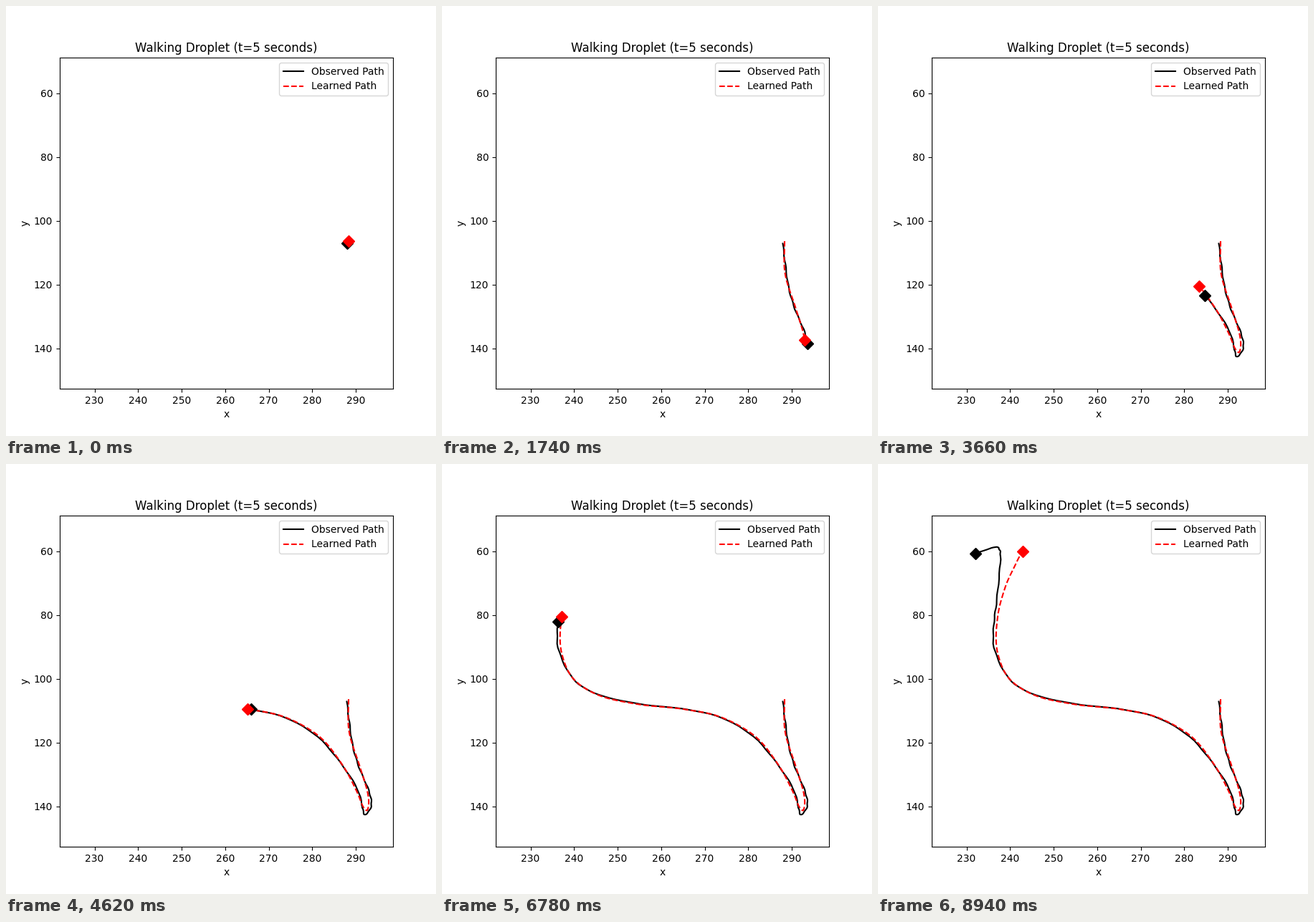
A matplotlib script that plays this animation: 600x600 px, repeating every 9000 ms.

```python
import numpy as np
import matplotlib.pyplot as plt
from matplotlib.animation import FuncAnimation

FRAMES, STEP = 150, 60

# Key poses (frame, x, y) in stage pixels, y pointing down
OBSERVED = [
    (0, 475.5, 331.5), (5, 479, 360), (11, 484, 394), (17, 492.5, 423),
    (24, 506, 455), (32, 509.5, 478), (39, 500, 489), (43, 497.5, 480),
    (48, 497, 477), (53, 490.5, 454), (59, 466, 416), (66, 428.5, 375.5),
    (71, 390, 354), (77, 341.5, 342.5), (85, 277, 335), (92, 219, 322),
    (99, 182.5, 299), (105, 163.5, 262), (113, 162, 220), (118, 165, 196),
    (128, 171, 129), (134, 169, 118.5), (142, 161, 116.5), (149, 136, 125),
]
LEARNED = [
    (0, 478, 328), (8, 478.5, 372), (17, 493.5, 421.5), (26, 504.5, 458),
    (33, 506, 475), (38, 503.5, 483.5), (42, 498.5, 478.5),
    (48, 489.5, 457), (56, 467.5, 417), (64, 432.5, 376.5),
    (70, 390, 353.5), (77, 336.5, 342), (85, 272, 335), (92, 217, 322),
    (98, 183, 299.5), (104, 167.5, 266), (113, 167, 213),
    (121, 177.5, 172), (130, 191.5, 141), (149, 202, 121.5),
]


def to_data(px, py):
    return 230 + (px - 123.5) / 6.075, 60 + (py - 121.8) / 4.45


def spline(t, keys, vals):
    """Cubic Hermite curve through the keyed values."""
    slope = np.gradient(vals, keys)
    i = np.clip(np.searchsorted(keys, t, side="right") - 1, 0, len(keys) - 2)
    h = keys[i + 1] - keys[i]
    u = (t - keys[i]) / h
    return ((1 + 2 * u) * (1 - u) ** 2 * vals[i]
            + u * (1 - u) ** 2 * h * slope[i]
            + u * u * (3 - 2 * u) * vals[i + 1]
            + u * u * (u - 1) * h * slope[i + 1])


def trajectory(points, wobble=0.0):
    keys, px, py = np.array(points, dtype=float).T
    t = np.arange(FRAMES)
    sway = wobble * np.sin(1.4 * t)
    return to_data(spline(t, keys, px) + sway, spline(t, keys, py))


fig, ax = plt.subplots(figsize=(6, 6), dpi=100)
left, top = to_data(75, 72)
right, bottom = to_data(540, 534)
ax.set(xlim=(left, right), ylim=(bottom, top), xlabel="x", ylabel="y",
       title="Walking Droplet (t=5 seconds)")

paths = [trajectory(OBSERVED, wobble=0.5), trajectory(LEARNED)]
lines = [ax.plot([], [], "k-", label="Observed Path")[0],
         ax.plot([], [], "r--", label="Learned Path")[0]]
drops = [ax.plot([], [], c + "D", markersize=8)[0] for c in "kr"]
ax.legend(loc="upper right")


def update(n):
    for (x, y), line, drop in zip(paths, lines, drops):
        line.set_data(x[:n + 1], y[:n + 1])
        drop.set_data(x[n:n + 1], y[n:n + 1])
    return lines + drops


anim = FuncAnimation(fig, update, frames=FRAMES, interval=STEP,
                     repeat=True, repeat_delay=0)
plt.show()
```
